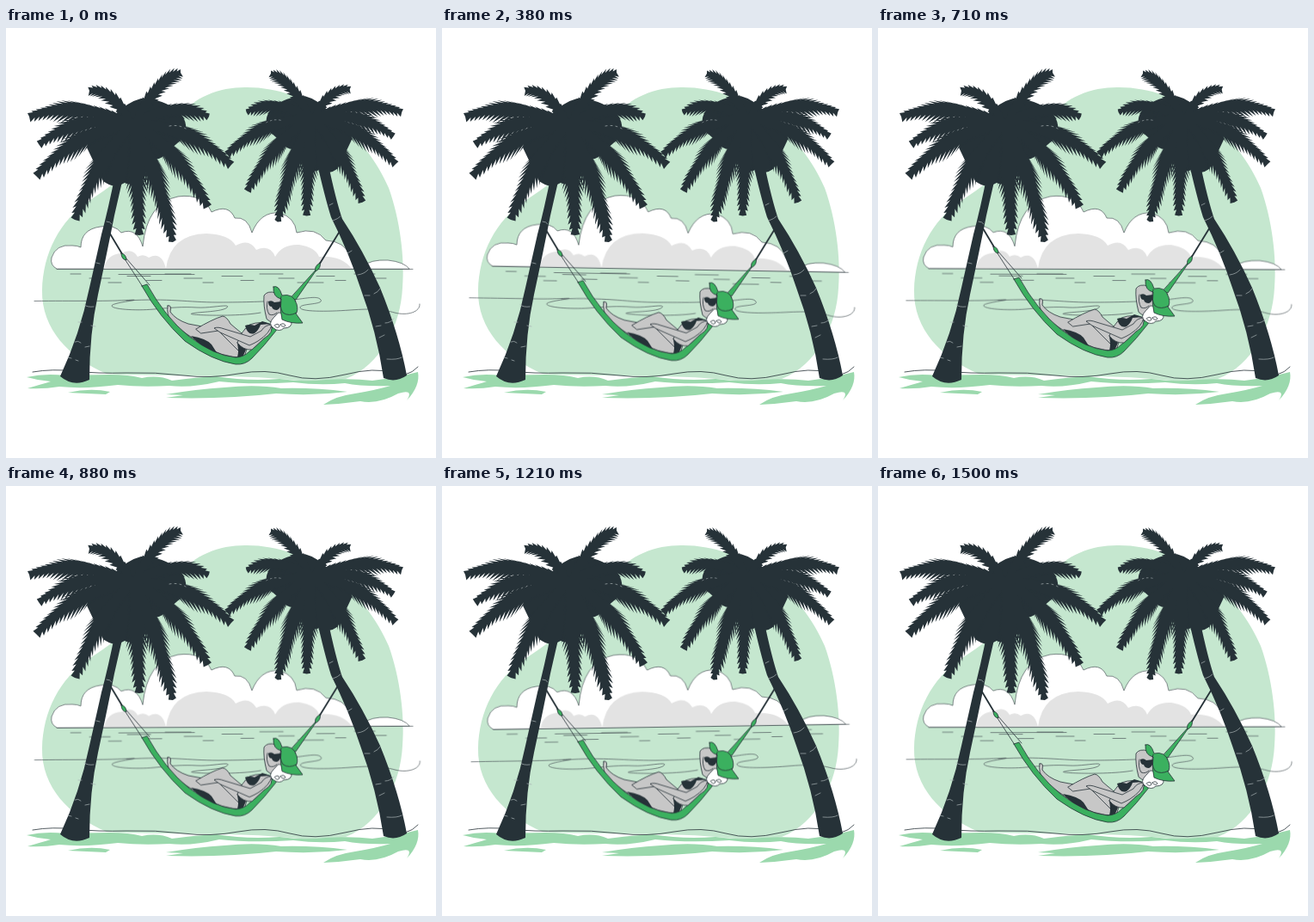
Animation, 500 px wide and 500 px high, one loop 1.54 s. Source, as an HTML page:

```html
<!DOCTYPE html>
<html lang="en">
<head>
<meta charset="utf-8">
<title>Hammock by the sea</title>
<style>
html, body { margin: 0; width: 100%; height: 100%; overflow: hidden; background: #fff; }
svg { display: block; width: 100%; height: 100%; }
#view { transform-origin: 250px 250px; }
.dark { fill: #263238; }
.pale { fill: #c5e7cf; }
.sand { fill: #9bd9ad; }
.green { fill: #3bb05f; }
.skin { fill: #c7c7c7; }
.white { fill: #fff; }
.mist { fill: #e3e3e3; }
.line { fill: none; }
.ink { stroke: #263238; stroke-width: .8; stroke-linejoin: round; stroke-linecap: round; }
.soft { stroke: #4c575b; stroke-width: .7; stroke-linecap: round; }
.ring { fill: none; stroke: #a9b3b5; stroke-width: .7; stroke-linecap: round; }
</style>
</head>
<body>
<svg viewBox="0 0 500 500">
  <path class="pale" d="M278 69C352 68 418 122 445 186C458 222 464 268 461 302C459 345 436 392 395 408Q376 413 350 411C280 402 190 406 117 402C74 384 41 350 42 305C43 262 62 224 98 200C140 172 178 142 200 105C218 80 248 69 278 69Z"/>

  <g id="view">
    <path class="white soft" d="M59 280Q51 276 53 267Q58 251 77 253Q83 253 87 255Q87 234 110 231Q126 228 134 238Q152 231 159 254Q164 203 200 196Q229 192 239 214Q259 204 266 221Q281 219 286 238Q296 213 318 215Q336 220 338 238Q360 231 372 247Q394 248 400 265Q410 268 415 277Q424 269 444 270Q463 272 469 280Z"/>
    <path class="mist" d="M114 280Q117 263 134 262Q147 255 153 266Q160 262 166 267Q181 259 186 280Q191 240 233 239Q260 240 267 253Q283 244 291 258Q307 251 313 266Q321 251 341 252Q360 255 364 266Q390 264 402 280Z"/>
    <path class="line soft" d="M59 280.4H473M131 286.500H219"/>
    <path class="line soft" id="ripples"/>
    <path class="line soft" d="M33 317.500C80 317 112 318 140 316.500S123 319 123 323S150 329 172 327S205 324 222 325S262 320 257 325S224 330 216 332S270 336 296 331M140 317C190 314 212 319 246 319S300 318 322 317S362 310 366 316S342 320 342 325S372 330 400 328S437 327 452 331S482 330 481 321"/>
  </g>

  <path class="sand" d="M24 406Q46 401 68 404L120 403Q143 403 158 407Q177 403 193 410Q222 406 245 405Q280 411 318 408Q348 412 372 409Q402 407 426 410Q452 407 479 400Q482 416 466 433Q475 419 456 425Q433 438 412 434Q391 437 369 438Q383 428 406 425Q430 421 447 416Q414 417 394 413Q365 416 334 412Q286 415 248 411Q215 419 190 416Q158 418 130 415Q92 420 62 417Q44 420 25 419Q42 414 52 411Q38 410 24 406Z"/>
  <path class="sand" d="M72 424Q98 418 121 423L116 426ZM186 426Q221 420 254 418Q291 414 320 419Q358 418 397 423Q357 428 314 425Q254 432 186 430L206 427Z"/>
  <path class="line ink" d="M31 400Q54 396 80 399T140 401T206 404T270 402T330 404T394 403T448 401T479 394"/>

  <g id="bed">
    <path class="line ink" style="stroke-width:1.8" d="M119 236L137 266M387 238L363 277"/>
    <path class="line ink" d="M137 267L159 301M139 267L167 299"/>
    <path class="green ink" d="M364 277L337 316L331 314Z"/>
    <path class="green ink" d="M134 262Q140 263 140 270Q134 269 134 262ZM365 273Q367 279 360 283Q358 277 365 273Z"/>
    <path class="skin ink" d="M188 323Q193 321 191 330Q197 339 212 344L270 355L284 360L277 383Q250 384 225 366L193 344Q186 332 188 323Z"/>
    <path class="skin ink" d="M221 350Q239 339 252 335Q257 336 261 344L280 360L270 375L247 352L227 355Z"/>
    <path class="dark" d="M215 358Q233 361 239 368L246 379Q230 374 215 358ZM269 367Q275 367 279 374L275 383H269Q271 376 269 367Z"/>
    <path class="green ink" d="M158 300L164 298Q185 336 212 358Q242 381 267 383Q276 383 283 376Q298 365 312 345L332 320L337 317Q316 354 286 384Q278 392 267 391Q240 387 208 364Q178 336 158 300Z"/>
    <path class="skin ink" d="M269 366Q274 352 283 345Q297 340 308 345Q312 354 300 361L286 374Q276 375 269 366Z"/>
    <path class="dark" d="M278 346Q283 344 289 346L298 341L308 344L296 345Q294 351 289 355Q281 358 278 346Z"/>
    <path class="skin ink" d="M309 345Q301 345 297 352L284 359L254 350Q246 347 242 349L249 354L283 369Q288 367 293 364Q307 355 309 345Z"/>
    <path class="skin ink" d="M303 338Q299 323 300 311Q304 305 314 308L321 317V337L310 343Z"/>
    <path class="line ink" d="M304 318Q302 326 306 333Q311 335 315 331"/>
    <path class="white ink" d="M311 337Q304 344 311 349Q318 354 323 349Q333 349 332 341Q334 337 328 332L317 331Z"/>
    <path class="line ink" d="M312 346Q317 342 318 347Q316 350 313 347M319 345Q323 342 325 346Q322 349 319 345"/>
    <path class="dark" d="M305 318Q309 316 312 319L320 318Q320 326 315 328Q310 328 309 324Q305 324 305 318Z"/>
    <path class="green ink" d="M311 301Q317 298 321 311Q334 308 338 321Q340 329 337 332L345 343Q331 344 321 339Q318 328 320 315Q310 313 311 301Z"/>
    <path class="line ink" d="M320 312Q317 323 322 331Q329 336 338 331"/>
  </g>

  <path class="dark" d="M127 170Q119 210 111 240L97 302Q86 356 63 405Q78 418 97 409Q97 355 107 310Q119 254 126 218L137 170Z"/>
  <path class="dark" d="M360 150Q371 198 378 220Q399 262 412 302Q431 353 439 407Q453 413 466 404Q457 356 435 302Q415 258 391 222Q384 202 374 155Z"/>
  <path class="ring" d="M117 225Q121 225 123 228M105 273L109 274M91 322Q95 325 102 324M99 346L104 347M84 342H88M80 365Q84 363 87 366M92 371L97 370M72 383L76 384M81 386L84 387M376 206L380 204M380 224Q386 222 389 219M397 262L402 259M409 287Q417 286 421 281M417 311H423M428 309Q433 307 435 303M430 347L436 346M441 343Q447 343 451 338M434 360L440 357M443 385Q455 386 460 383"/>
  <g id="crown">
    <path class="dark" d="M106 110L124 103Q141 86 157 82Q183 82 202 98Q214 112 206 128L190 142Q180 155 170 152L162 170Q150 186 138 180Q126 188 113 178L104 160L94 139Z"/>
    <path class="dark" id="fronds"/>
    <path class="ring" stroke-dasharray="2 4" d="M190 114Q200 112 209 117"/>
  </g>
  <use href="#crown" transform="matrix(-.865 0 0 .875 483.6 7.5)"/>
</svg>
<script>
const $ = id => document.getElementById(id);
const LOOP = 1540;
const heart = [148, 112];
const tips = [
  [203, 52], [236, 103], [262, 159], [235, 208], [194, 249], [155, 241],
  [80, 223], [35, 172], [38, 135], [27, 103], [97, 73]
];

// Feathered leaf: arches up from the heart, leaflets sweep towards the tip on both sides
function frond([cx, cy]) {
  const [ax, ay] = heart;
  const bx = ax + (cx - ax) * .55, by = ay + (cy - ay) * .5 - 25;
  const span = Math.hypot(cx - ax, cy - ay);
  const teeth = Math.round(span / 6);
  const at = (t, off, ahead, drop) => {
    const u = 1 - t;
    const dx = u * (bx - ax) + t * (cx - bx), dy = u * (by - ay) + t * (cy - by);
    const d = Math.hypot(dx, dy);
    const x = u * u * ax + 2 * u * t * bx + t * t * cx + (dx * ahead - dy * off) / d;
    const y = u * u * ay + 2 * u * t * by + t * t * cy + (dy * ahead + dx * off) / d + drop;
    return x.toFixed(1) + ' ' + y.toFixed(1);
  };
  const edge = side => {
    const pts = [];
    for (let i = 0; i < teeth; i++) {
      const t = i / teeth;
      const w = (8 + span * .06) * (.3 + .7 * Math.sin(Math.PI * t)) * (.92 + .12 * Math.sin(i * 7));
      pts.push(at(t, side * w * .5, 0, 0), at(t, side * w * .85, w * .95, w * .2));
    }
    return pts;
  };
  return 'M' + [...edge(1), at(1, 0, 0, 0), ...edge(-1).reverse()].join('L') + 'Z';
}
$('fronds').setAttribute('d', tips.map(frond).join(''));

// Short dashes scattered in rows under the horizon
const ripple = (_, i) => `M${75 + i * 22} ${286 + i * 7 % 5 * 2.5}h${12 + i * 11 % 7 * 3}`;
$('ripples').setAttribute('d', Array.from({ length: 17 }, ripple).join(''));

const play = (id, steps) => $(id).animate(
  steps.map(([offset, transform]) => ({ offset, transform })),
  { duration: LOOP, iterations: Infinity }
);
play('view', [[0, 'rotate(0deg)'], [.25, 'rotate(1deg)'], [.75, 'rotate(-1deg)'], [1, 'rotate(0deg)']]);

const bob = p => 4 * (Math.cos(2 * Math.PI * (p + .02)) - 1);
play('bed', Array.from({ length: 25 }, (_, i) => [i / 24, `translateY(${bob(i / 24).toFixed(2)}px)`]));
</script>
</body>
</html>
```
